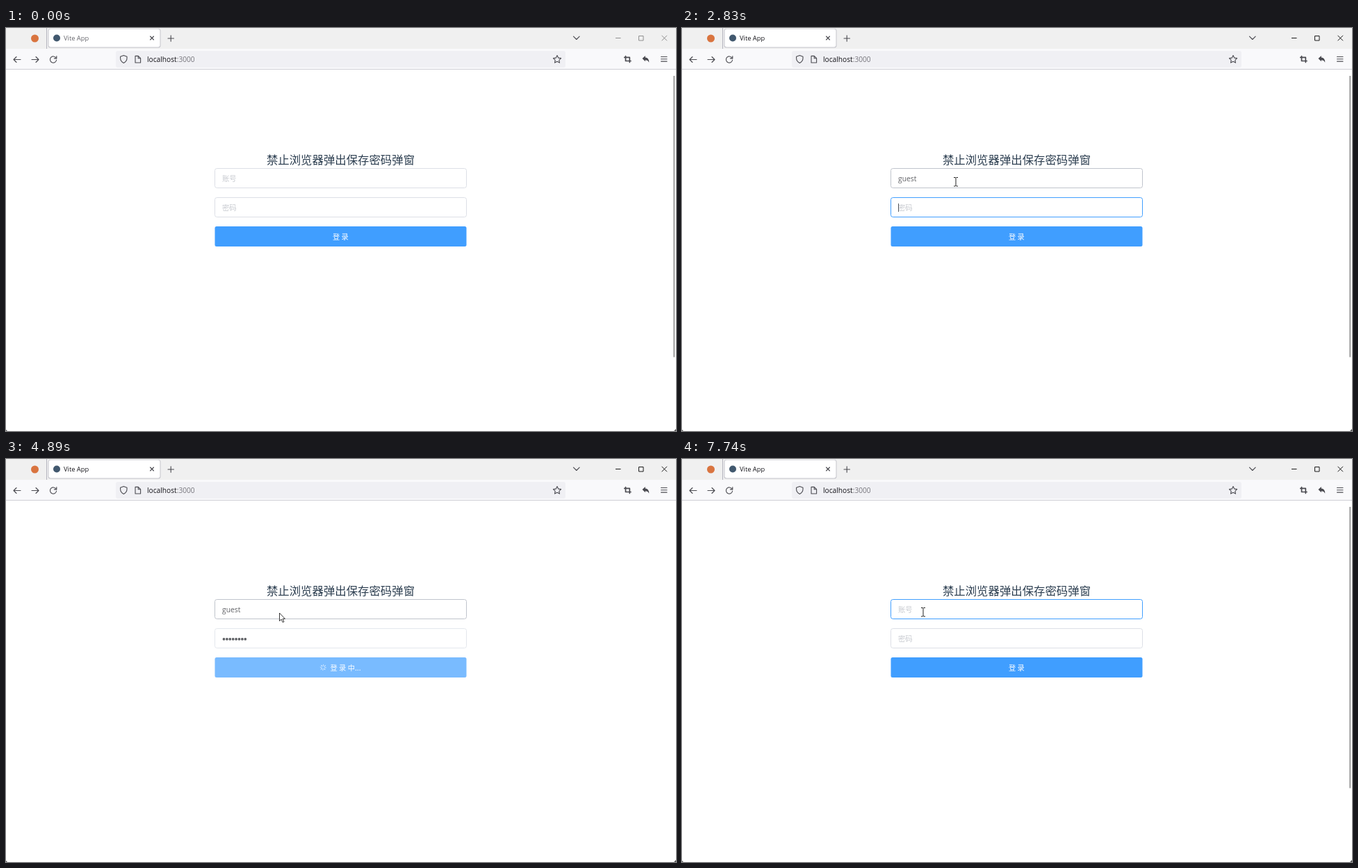
Write an HTML page that moves like this. It is 964 px wide and 581 px high and loops after 8 s.

```html
<!DOCTYPE html>
<html lang="zh">
<head>
<meta charset="utf-8">
<title>Login demo</title>
<style>
  html, body { margin: 0; width: 100%; height: 100%; overflow: hidden; background: #fff; }
  svg { display: block; width: 964px; height: 581px; }
  text { font-family: "Open Sans", "Noto Sans", "Noto Sans CJK SC", "Noto Sans CJK", sans-serif; }
  .cjk { font-family: "Noto Sans CJK SC", "Noto Sans CJK", sans-serif; }
  .small { font-size: 10.3px; }
  .line { fill: none; stroke: #4a4a50; stroke-width: 1.1; stroke-linecap: round; stroke-linejoin: round; }
  .hint { fill: #c6c9cf; }
  .value { fill: #606266; }
</style>
</head>
<body>
<svg viewBox="0 0 964 581">
  <rect width="964" height="581" fill="#fff"/>

  <!-- tab strip -->
  <rect width="964" height="30" fill="#f0f0f0"/>
  <circle cx="41.5" cy="15" r="5.5" fill="#d9743f"/>
  <path d="M58.5 0V30" stroke="#b4b4be"/>
  <rect x="60.5" y="1" width="162" height="27.5" rx="3.5" fill="#c4c4cb"/>
  <rect x="61.5" y="1.5" width="160" height="26" rx="3" fill="#fff"/>
  <circle cx="73" cy="14.5" r="5" fill="#41586e"/>
  <text id="tabTitle" x="83" y="18" font-size="9.3">Vite App</text>
  <path class="line" d="M207.5 12l5 5m0-5l-5 5M233 15h8.5M237.2 10.8v8.5M816.5 12.2l4.3 4.3 4.3-4.3"/>
  <path id="winButtons" fill="none" d="M877 14.5h7.5M910.5 11.5h6.5v6.5h-6.5zM943.5 10.8l7.5 7.5m0-7.5l-7.5 7.5"/>

  <!-- toolbar -->
  <rect y="30" width="964" height="29" fill="#f9f9fb"/>
  <path d="M0 59.5H964" stroke="#cfcfd6"/>
  <rect id="backHover" x="4" y="33" width="24" height="24" rx="3"/>
  <path class="line" d="M21 45.5h-10m4-4l-4 4 4 4"/>
  <path id="forward" class="line" d="M37 45.5h10m-4-4l4 4-4 4"/>
  <path class="line" d="M72 43.2a4.6 4.6 0 1 0 .6 2.8M72.8 40.5v3.4h-3.4"/>
  <rect x="158" y="33" width="647" height="24" rx="3" fill="#f0f0f4"/>
  <path class="line" d="M169.3 39.6l4.7 1.7v2.5q0 4.2-4.7 6.7q-4.7-2.5-4.7-6.7v-2.5zM186 40.4h4.3l3.3 3.2v6.4h-7.6zM190.2 40.4v3.3h3.4"/>
  <text x="203" y="48.5" font-size="10.2" fill="#15141a">localhost<tspan id="urlRest" fill="#77767d"></tspan></text>
  <path class="line" d="M793 39.6l1.7 3.5 3.9.5-2.8 2.7.7 3.8-3.5-1.8-3.5 1.8.7-3.8-2.8-2.7 3.9-.5z"/>
  <path class="line" style="stroke-width:1.7" d="M891.5 40.5v7h7.5M889.8 42.4h7.5v7"/>
  <path d="M915.5 44l4.3-4v2.5q5.4.2 5.4 7.2q-1.6-3.4-5.4-3.4v2z" fill="#4a4a50"/>
  <path class="line" d="M942.5 41.5h8.5m-8.5 3.3h8.5m-8.5 3.3h8.5"/>

  <g id="loginPage">
    <text class="cjk" x="481.5" y="196" text-anchor="middle" font-size="16.4" fill="#2c3e50">禁止浏览器弹出保存密码弹窗</text>
    <rect id="userBox" x="300.5" y="202.5" width="362" height="28" rx="3" fill="#fff"/>
    <text id="userHint" class="cjk small hint" x="311" y="220.8">账号</text>
    <text id="userText" class="small value" x="311" y="220.6"></text>
    <rect id="passBox" x="300.5" y="244.5" width="362" height="28" rx="3" fill="#fff"/>
    <text id="passHint" class="cjk small hint" x="311" y="262.8">密码</text>
    <g id="dots" class="value"></g>
    <rect id="caret" width="1" height="12" fill="#55575c"/>
    <rect id="button" x="300.5" y="286" width="362" height="29" rx="2.5"/>
    <g id="spinner" stroke="#fff" stroke-width=".9" stroke-linecap="round"></g>
    <text id="buttonText" class="cjk small" y="304.8" fill="#fff" font-weight="500"></text>
  </g>

  <text id="mainPage" x="0" y="86" font-size="20.8" fill="#2c3e50">login success!!!</text>
  <rect id="edge" x="960.5" y="69" width="1.5" height="405.5" fill="#858585"/>
  <path d="M964 578v3h-3zM0 579v2h2z" fill="#555"/>

  <path id="beam" fill="none" stroke="#222" d="M-3-6.5h2.2l.8.8.8-.8H3M0-5.7V5.2M-3 6h2.2l.8-.8.8.8H3"/>
  <path id="arrow" fill="#fff" stroke="#222" stroke-width=".9" stroke-linejoin="round" d="M0 0V11.5l2.7-2.4 1.9 4.3 1.9-.8-1.9-4.2H8z"/>
</svg>
<script>
const LOOP = 8000;
const NAME = "guest";
const NAME_KEYS = [1810, 2010, 2080, 2150, 2220];
const PASS_KEYS = [2970, 3110, 3180, 3250, 3310, 3450, 3520, 3590];
const FOCUS_USER = 940, FOCUS_PASS = 2430, SUBMIT = 3860, LOGGED_IN = 4950, BACK = 6480, REFOCUS = 7240;
const IDLE = [220, 223, 230], HOVER = [192, 196, 204], BLUE = [64, 158, 255],
      PALE = [121, 187, 255], DISABLED = [228, 231, 237];

// Each entry: time, colour that the border fades to
const USER_BORDER = [[0, IDLE], [820, HOVER], [FOCUS_USER, BLUE], [FOCUS_PASS, HOVER],
                     [LOGGED_IN, IDLE], [7080, HOVER], [REFOCUS, BLUE]];
const PASS_BORDER = [[0, IDLE], [FOCUS_PASS, BLUE], [SUBMIT, DISABLED], [LOGGED_IN, IDLE]];
const BUTTON_FILL = [[0, BLUE], [SUBMIT, PALE], [LOGGED_IN, BLUE]];

// Each entry: time, x, y of the pointer
const POINTER = [[390, 966, 583], [530, 760, 420], [670, 540, 285], [800, 415, 230], [870, 394, 222],
                 [5560, 394, 222], [5750, 215, 125], [5950, 73, 60], [6080, 25, 48], [6210, 16, 45],
                 [6700, 16, 45], [6820, 75, 88], [6980, 250, 185], [7140, 347, 221]];

const el = {};
document.querySelectorAll("[id]").forEach(node => el[node.id] = node);
const set = (node, attrs) => { for (const k in attrs) node.setAttribute(k, attrs[k]); };
const show = (node, on) => node.setAttribute("visibility", on ? "inherit" : "hidden");
const within = (v, a, b) => v >= a && v < b;
const mix = (a, b, k) => a + (b - a) * k;
const typed = (keys, t) => keys.filter(k => k <= t).length;

function add(parent, tag, attrs) {
  const node = document.createElementNS("http://www.w3.org/2000/svg", tag);
  set(node, attrs);
  return parent.appendChild(node);
}

const dots = PASS_KEYS.map(() => add(el.dots, "circle", {}));
for (let i = 0; i < 8; i++)
  add(el.spinner, "path", { d: "M0-2.2V-4.1", transform: `rotate(${i * 45})`, opacity: 0.7 + 0.3 * (i % 2) });

function fade(stops, t, duration) {
  const i = stops.findLastIndex(s => s[0] <= t);
  const [start, to] = stops[i], from = stops[Math.max(0, i - 1)][1];
  const k = Math.min(1, (t - start) / duration);
  return `rgb(${to.map((c, n) => Math.round(mix(from[n], c, k)))})`;
}

function pointerAt(t) {
  const i = POINTER.findLastIndex(p => p[0] <= t);
  if (i < 0) return null;
  const a = POINTER[i], b = POINTER[i + 1] || a;
  const k = b === a ? 0 : (t - a[0]) / (b[0] - a[0]);
  return [mix(a[1], b[1], k), mix(a[2], b[2], k)];
}

function isOverText(x, y, t, onMain) {
  if (onMain) return x < 145 && within(y, 59.5, 95);
  if (within(t, 4680, LOGGED_IN)) return false;
  return (within(x, 300, 663) && (within(y, 202, 231) || within(y, 244, 273))) ||
         (within(x, 375, 588) && within(y, 180, 202));
}

function drawPointer(t, onMain) {
  const p = pointerAt(t);
  const text = p && isOverText(...p, t, onMain);
  show(el.beam, text);
  show(el.arrow, p && !text);
  if (p) {
    set(el.beam, { transform: `translate(${p})` });
    set(el.arrow, { transform: `translate(${p[0] - 0.5} ${p[1]})` });
  }
  const hover = p && within(p[0], 4, 28) && within(p[1], 33, 57);
  show(el.backHover, hover);
  set(el.backHover, { fill: within(t, 6410, 6550) ? "#cfcfd8" : "#e1e1e6" });
}

function drawCaret(t, passCount) {
  const onUser = within(t, FOCUS_USER, FOCUS_PASS) || t >= REFOCUS;
  const onPass = within(t, FOCUS_PASS, SUBMIT);
  const last = Math.max(...[FOCUS_USER, FOCUS_PASS, REFOCUS, ...NAME_KEYS, ...PASS_KEYS].filter(k => k <= t));
  const phase = last === FOCUS_USER ? t - 960 : t - last;
  show(el.caret, (onUser || onPass) && phase % 1000 < 500);
  const width = onPass ? passCount * 5.83 : el.userText.getComputedTextLength();
  set(el.caret, { x: Math.round(311 + width), y: onPass ? 253 : 211 });
}

function drawForm(t) {
  const fresh = t >= LOGGED_IN;
  const userCount = fresh ? 0 : typed(NAME_KEYS, t);
  const passCount = fresh ? 0 : typed(PASS_KEYS, t);
  const loading = within(t, SUBMIT, LOGGED_IN);

  el.userText.textContent = NAME.slice(0, userCount);
  show(el.userHint, !userCount);
  show(el.passHint, !passCount);
  const pitch = loading ? 4.4 : 5.83, r = loading ? 1.85 : 2.4;
  dots.forEach((dot, i) => {
    show(dot, i < passCount);
    set(dot, { cx: 311.3 + pitch * (i + 0.5), cy: 259.7, r });
  });

  set(el.userBox, { stroke: fade(USER_BORDER, t, 200) });
  set(el.passBox, { stroke: fade(PASS_BORDER, t, 200) });
  set(el.button, { fill: fade(BUTTON_FILL, t, 100) });
  el.buttonText.textContent = loading ? "登 录 中..." : "登 录";
  set(el.buttonText, { x: loading ? 466.5 : 470 });
  show(el.spinner, loading);
  set(el.spinner, { transform: `translate(456.3 300.5) rotate(${(t - SUBMIT) * 0.18})` });
  drawCaret(t, passCount);
}

function draw(t) {
  const active = t >= FOCUS_USER;
  const onMain = within(t, LOGGED_IN, BACK);
  set(el.tabTitle, { fill: active ? "#15141a" : "#66666c" });
  set(el.winButtons, { stroke: active ? "#1a1a1a" : "#8f8f8f" });
  set(el.forward, { opacity: onMain ? 0.4 : 1 });
  el.urlRest.textContent = onMain ? ":3000/main" : ":3000";
  show(el.loginPage, !onMain);
  show(el.mainPage, onMain);
  show(el.edge, !within(t, 3650, BACK));
  drawForm(t);
  drawPointer(t, onMain);
}

let start;
function tick(now) {
  start ??= now;
  draw((now - start) % LOOP);
  requestAnimationFrame(tick);
}
draw(0);
requestAnimationFrame(tick);
</script>
</body>
</html>
```
